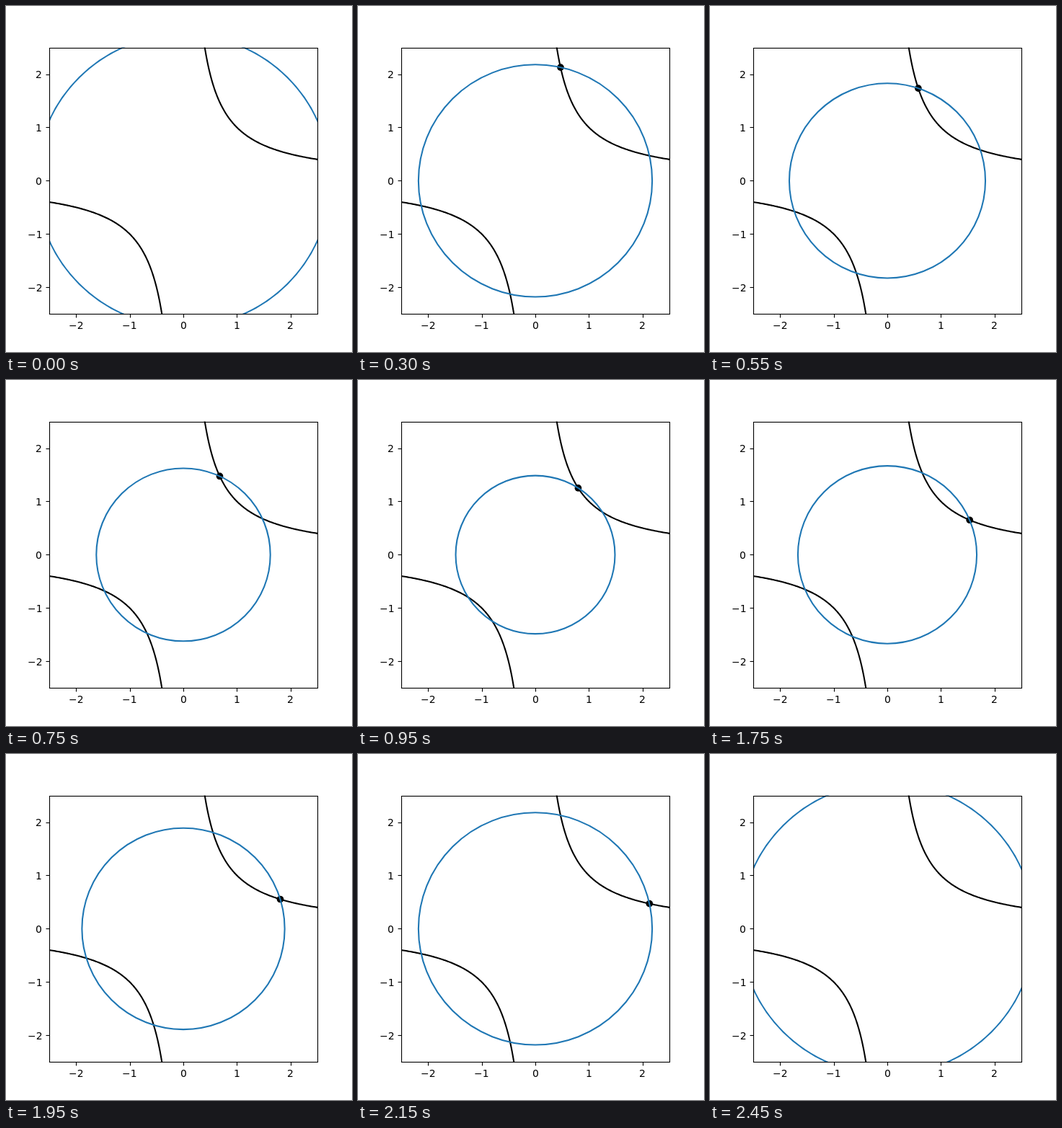
Recreate the animation shown at these times as an HTML page with a canvas. Size 480 px wide and 480 px high, loop 2.5 s.

```html
<!DOCTYPE html>
<html lang="en">
<head>
<meta charset="utf-8">
<title>Circle and hyperbola</title>
<style>
  html, body { margin: 0; width: 100%; height: 100%; overflow: hidden; background: #fff; }
  canvas { display: block; width: 480px; height: 480px; }
</style>
</head>
<body>
<canvas id="stage" width="480" height="480"></canvas>
<script>
const ctx = document.getElementById('stage').getContext('2d');
const STEPS = 50, STEP_MS = 50;
const PT = 100 / 72;
const LIMIT = 2.5;
const box = { left: 60, right: 432, top: 57.6, bottom: 427.2 };
const unitX = (box.right - box.left) / (2 * LIMIT);
const unitY = (box.bottom - box.top) / (2 * LIMIT);
const px = x => (box.left + box.right) / 2 + x * unitX;
const py = y => (box.top + box.bottom) / 2 - y * unitY;
const snap = v => Math.floor(v + 0.5) + 0.5;

function line(x1, y1, x2, y2) {
  ctx.beginPath();
  ctx.moveTo(x1, y1);
  ctx.lineTo(x2, y2);
  ctx.stroke();
}

function drawHyperbola() {
  ctx.strokeStyle = '#000';
  ctx.lineWidth = 1.5 * PT;
  for (const sign of [-1, 1]) {
    ctx.beginPath();
    for (let u = -1.1; u <= 1.1; u += 0.01) {
      ctx.lineTo(px(sign * Math.exp(u)), py(sign * Math.exp(-u)));
    }
    ctx.stroke();
  }
}

function drawDot(x, y) {
  ctx.fillStyle = '#000';
  ctx.beginPath();
  ctx.arc(px(x), py(y), 3.5 * PT, 0, 2 * Math.PI);
  ctx.fill();
}

function drawCircle(r) {
  ctx.strokeStyle = '#1f77b4';
  ctx.lineWidth = 1.5 * PT;
  ctx.beginPath();
  ctx.ellipse(px(0), py(0), r * unitX, r * unitY, 0, 0, 2 * Math.PI);
  ctx.stroke();
}

function drawAxes() {
  const left = snap(box.left), right = snap(box.right);
  const top = snap(box.top), bottom = snap(box.bottom);
  ctx.strokeStyle = ctx.fillStyle = '#000';
  ctx.lineWidth = 0.8 * PT;
  ctx.strokeRect(left, top, right - left, bottom - top);
  ctx.font = `${10 * PT}px "DejaVu Sans", sans-serif`;
  for (let k = -2; k <= 2; k++) {
    const x = px(k), y = py(k);
    line(snap(x), bottom, snap(x), bottom + 5);
    line(left, snap(y), left - 5, snap(y));
    const label = String(k).replace('-', '\u2212');
    const width = ctx.measureText(label).width;
    ctx.fillText(label, Math.round(x - width / 2), 448);
    ctx.fillText(label, Math.round(box.left - 7 * PT - width), Math.round(y + 5.28));
  }
}

function draw(step) {
  const u = -1 + 2 * step / (STEPS - 1);
  const x = Math.exp(u), y = 1 / x;
  ctx.fillStyle = '#fff';
  ctx.fillRect(0, 0, 480, 480);
  ctx.save();
  ctx.beginPath();
  ctx.rect(box.left, box.top, box.right - box.left, box.bottom - box.top);
  ctx.clip();
  drawDot(x, y);
  drawHyperbola();
  drawCircle(Math.hypot(x, y));
  ctx.restore();
  drawAxes();
}

function tick() {
  draw(Math.floor(performance.now() / STEP_MS) % STEPS);
  requestAnimationFrame(tick);
}
tick();
</script>
</body>
</html>
```
